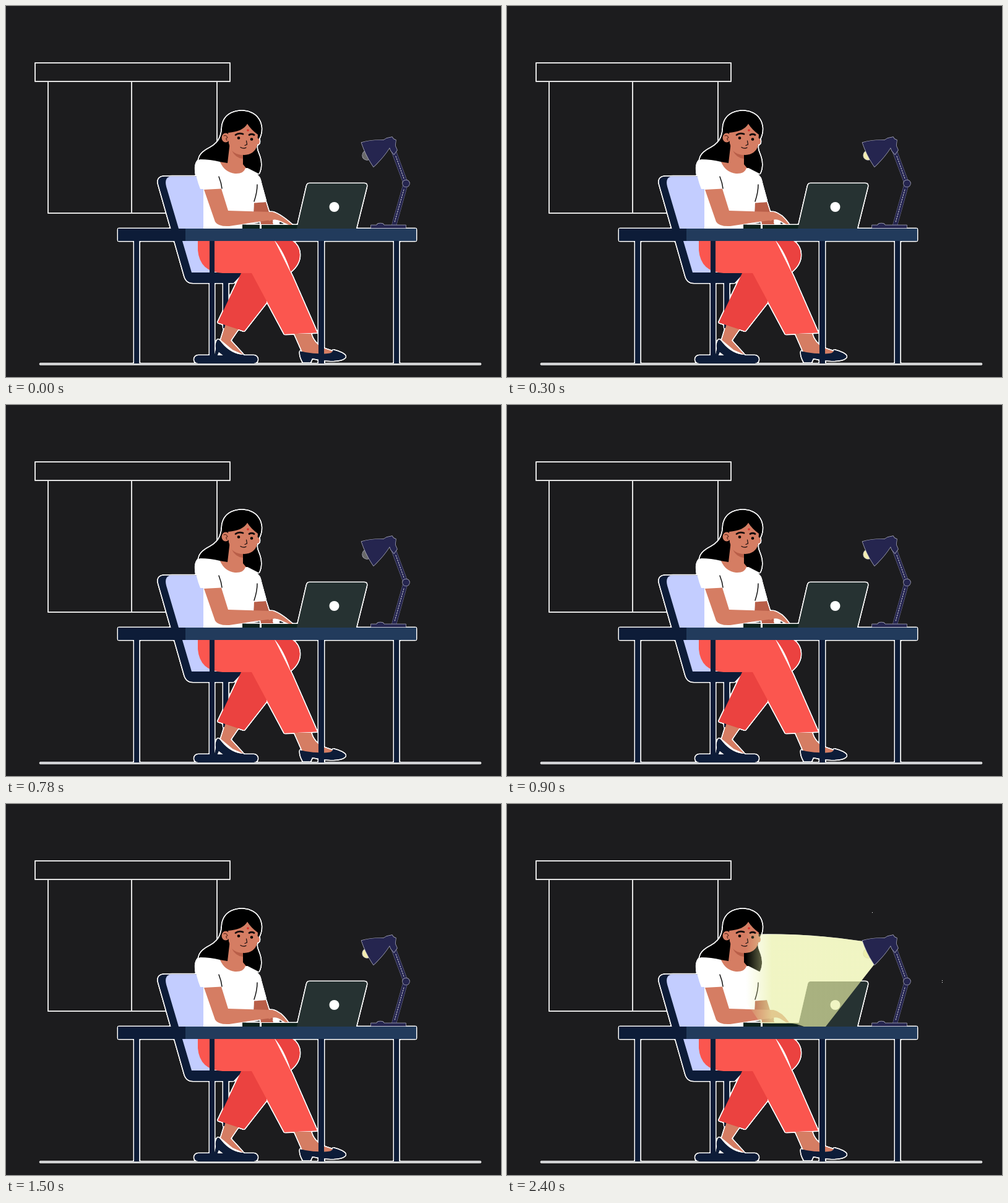
Animation, 800 px wide and 600 px high, one loop 2800 ms. Source, as an HTML page without scripts:

```html
<!DOCTYPE html>
<html lang="en">
<head>
<meta charset="utf-8">
<title>Working at a desk by lamplight</title>
<style>
  html, body { margin: 0; width: 100%; height: 100%; overflow: hidden; background: #1c1c1e; }
  svg { display: block; width: 100%; height: 100%; }

  .fine { stroke: #b4b4c6; stroke-width: 1.4; stroke-linejoin: round; paint-order: stroke; }
  .line { fill: none; stroke-linecap: round; stroke-linejoin: round; }
  .navy { fill: #0d1b38; }
  .desk { fill: #223a5c; }
  .skin { fill: #d57d63; }
  .shade { fill: #b95f49; }
  .coral { fill: #fb574f; }
  .red { fill: #eb423f; }
  .lilac { fill: #c3cdff; }
  .lamp { fill: #25254f; }
  .dark { fill: #10201f; }
  .white { fill: #fff; }

  /* Two typing poses alternate, then the lamp stays on */
  .a, .b, .glow { animation: 2800ms step-end infinite; }
  .a { animation-name: a; }
  .b { animation-name: b; }
  .glow { animation-name: glow; }
  @keyframes a {
    0%, 21.428%, 42.857% { visibility: visible; }
    10.714%, 32.142%, 53.571%, 100% { visibility: hidden; }
  }
  @keyframes b {
    0%, 21.428%, 42.857% { visibility: hidden; }
    10.714%, 32.142%, 53.571%, 100% { visibility: visible; }
  }
  @keyframes glow {
    0% { visibility: hidden; }
    64.285%, 100% { visibility: visible; }
  }
</style>
</head>
<body>
<svg viewBox="0 0 800 600">
  <defs>
    <linearGradient id="fade" gradientUnits="userSpaceOnUse" x1="386" y1="0" x2="428" y2="0">
      <stop offset="0" stop-color="#e9f0a6" stop-opacity="0"/>
      <stop offset="1" stop-color="#e9f0a6" stop-opacity=".67"/>
    </linearGradient>
    <!-- white rim around the whole silhouette -->
    <filter id="rim" filterUnits="userSpaceOnUse" x="0" y="0" width="800" height="600">
      <feGaussianBlur in="SourceAlpha" stdDeviation="1.2"/>
      <feComponentTransfer result="grown">
        <feFuncA type="linear" slope="12" intercept="-.5"/>
      </feComponentTransfer>
      <feFlood flood-color="#fff"/>
      <feComposite in2="grown" operator="in"/>
      <feMerge>
        <feMergeNode/>
        <feMergeNode in="SourceGraphic"/>
      </feMerge>
    </filter>
  </defs>
  <rect width="800" height="600" fill="#1c1c1e"/>

  <!-- window -->
  <g class="line" stroke="#e2e2e2" stroke-width="2">
    <rect x="47" y="92" width="315" height="30"/>
    <path d="M68 122V335H270M203 122V335M341 122V230"/>
  </g>

  <path class="glow white" d="M403 210.500Q490 209 575 222L593 260L515 359H413L400 300Z"/>

  <g filter="url(#rim)">
    <path class="line" d="M55 579H767" stroke="#3a4450" stroke-width="1.200"/>

    <!-- chair -->
    <g class="navy">
      <rect x="351" y="446" width="8.500" height="75"/>
      <rect x="304" y="565" width="103" height="13" rx="6.500"/>
      <rect x="329" y="440" width="8" height="130"/>
      <path d="M258 275.500Q242 275 246.500 290L288 436Q291 448 302 448H368L384 431H330V275.500Z"/>
    </g>
    <path class="lilac" d="M268 275.500H333V431H300L259 292Q255 276 268 275.500Z"/>

    <!-- feet -->
    <path class="skin" d="M355 514L347 540L366 556L384 564L363 541L376 522Z"/>
    <path class="navy" d="M342 539Q337 546 339 554L336 567H341L344 560Q358 573 378 574.500Q385 574 384 564Q364 563 349 545Q345 539 342 539Z"/>
    <path class="skin" d="M466 530H493Q497 545 512 553L530 559L522 563L480 562Z"/>
    <path class="navy" d="M475 558Q474 567 480 576.500H492L495 570Q510 573 524 574Q547 574 549 567Q548 561 528 556Q529 561 520 562Q500 563 484 560Z"/>

    <!-- trousers -->
    <path class="red" d="M381 430L342 512L385 526L421 480L425 430Z"/>
    <path class="coral" d="M310 379H434L463 437L503 528.500L450 531L397 432H350Q313 430 310 395Z"/>
    <path class="red" d="M434 379H462Q475 388 475 402Q475 418 460 430Q450 398 434 379Z"/>
    <rect class="navy" x="329" y="379" width="8" height="70"/>

    <!-- hair and head -->
    <path d="M381 169.500C360 170 350 182 349 197C348 215 341 223 328 230Q311 239 311.500 250L356 262H390L408.500 271.500Q416 257 408 238Q403 228 408 217Q413 208 413 198C412 181 400 170 381 169.500Z"/>
    <path class="skin" d="M362 220L358 254L346 252Q350 268 370 273L388 268V262L383 256V236Z"/>
    <path class="shade" d="M365 234Q372 241 383 241V247Q371 246 365 234Z"/>
    <g class="skin">
      <ellipse cx="355" cy="213" rx="6.500" ry="7.500"/>
      <ellipse cx="407" cy="219" rx="3" ry="5"/>
      <path d="M359 205Q383 203 390 190.500Q396 200 407 208L406 225Q402 240 385 241Q365 240 360 222Z"/>
    </g>
    <g class="line" stroke="#140b0b" stroke-width="1.200">
      <path d="M352 210Q356 208 358 213Q354 214 357 217" stroke="#5d2a1d"/>
      <path d="M371 208.500Q376 204.500 383 207M393 208.500Q397 206 401 208.500" stroke-width="2.800"/>
      <path d="M388.500 218L389.500 224L386 225.500M379 228.500Q384 231.500 388 229"/>
    </g>
    <circle cx="376" cy="213.500" r="2.300"/>
    <circle cx="397" cy="215.500" r="2.300"/>
    <circle cx="391" cy="201" r="1.800" fill="#d92f2b"/>

    <!-- shirt -->
    <path class="white" d="M314 248Q330 248 346 252Q353 269 370 271Q384 272 387 262L404 273Q410 275 412 287L420 316L401 319L398 333L385 360H319V296L314 296Q305 273 306.500 259Q308 249 314 248Z"/>
    <path class="line" stroke="#111" stroke-width="1.500" d="M344 276Q348 286 349 295M406 289Q406 301 401 316"/>

    <!-- arms -->
    <path class="shade" d="M401 318.500L420 317L426 336L400 334ZM410 342L431 344L432 353H412Z"/>
    <path class="skin" d="M320 297L348 295.500L359 331L426 333L430 346L400 350L361 356Q343 357 338 349Z"/>
    <ellipse class="white" cx="436" cy="350" rx="5" ry="3"/>
    <path class="a skin" d="M420 333H431Q444 337 463 354H457L444 348Q434 343 425 348Z"/>
    <path class="b skin" d="M420 333H431Q444 336 456 353H451L441 347Q433 343 425 348Z"/>

    <!-- laptop -->
    <path class="dark" d="M382 353.500H410V360H382ZM413 354H474V360H413Z"/>
    <path fill="#263332" d="M490 287H579Q584 287 583 292L566 360H470L486 291Q487 287 490 287Z"/>
    <circle class="white" cx="530.500" cy="325" r="8"/>

    <!-- desk -->
    <g class="navy">
      <rect x="207" y="378" width="8.500" height="200"/>
      <rect x="505" y="378" width="9" height="200"/>
      <rect x="627" y="378" width="8.500" height="200"/>
    </g>
    <rect class="desk" x="181" y="360" width="482" height="20"/>
    <rect class="navy" x="181" y="360" width="109" height="20"/>
  </g>

  <!-- bulb and beam -->
  <circle class="a fine" cx="583.500" cy="241.500" r="7.500" fill="#696969"/>
  <circle class="b fine" cx="583.500" cy="241.500" r="7.500" fill="#f3ecb2"/>
  <g class="glow">
    <path fill="url(#fade)" d="M386 208L413 211Q490 209 575 222L593 260L515 360H480Q466 354 450 355H410L386 320Z"/>
    <path class="white" d="M590 175h1v1h-1zM703 285h1v1h-1zM703 288h1v1h-1z"/>
  </g>

  <!-- lamp -->
  <g class="line">
    <path d="M627 236L646 287L627 355" stroke="#77778f" stroke-width="8"/>
    <path d="M627 236L646 287L627 355" stroke="#25254f" stroke-width="7"/>
    <path d="M630 243L643 279M643 297L628 350" stroke="#d8d8e0" stroke-dasharray="2 2"/>
  </g>
  <g class="lamp fine">
    <circle cx="646.500" cy="287" r="5.500"/>
    <path d="M590 359V354.500H599Q600 351.500 605 351.500T611 354.500H646V359Z"/>
    <path d="M574.500 221Q592 216 610 217L615 214L624 212L626 215L630 217L629 226L632 233L627 240L622 234L620 229Q610 245 594 260Q582 243 574.500 221Z"/>
  </g>
</svg>
</body>
</html>
```
